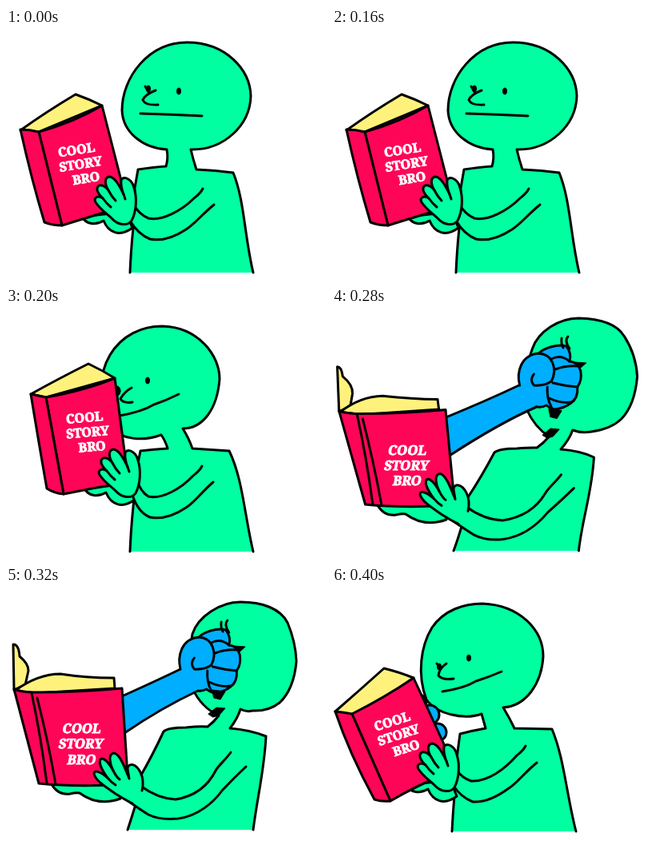
An HTML page that plays this animation: 400 by 314 pixels, repeating every 0.44 s.

```html
<!DOCTYPE html>
<html lang="en">
<head>
<meta charset="utf-8">
<title>Cool story</title>
<style>
  html, body { margin: 0; width: 100%; height: 100%; overflow: hidden; background: #fff; }
  svg { display: block; width: 100%; height: 100%; }
  path, circle, ellipse { stroke: #000; stroke-width: 3; stroke-linejoin: round; stroke-linecap: round; }
  .skin { fill: #00ffa0; }
  .cover { fill: #ff0558; }
  .page { fill: #fff27c; }
  .blue { fill: #00aeff; }
  .line { fill: none; }
  .ink { fill: #000; stroke-width: 1; }
  text { font: 900 16px "Noto Serif", serif; fill: #fff; stroke: #fff; stroke-width: .9; text-anchor: middle; }
  .pose { visibility: hidden; animation: show 440ms steps(1, end) calc(var(--at) * 40ms - 440ms) infinite; }
  .pose.long { animation-name: hold; }
  @keyframes show { 0% { visibility: visible; } 9.0909%, 100% { visibility: hidden; } }
  @keyframes hold { 0% { visibility: visible; } 45.4545%, 100% { visibility: hidden; } }
</style>
</head>
<body>
<svg viewBox="0 0 400 314" preserveAspectRatio="none">
  <defs>
    <g id="title">
      <text y="6">COOL</text>
      <text x="2.3" y="24.5">STORY</text>
      <text x="6.3" y="43">BRO</text>
    </g>
    <path id="under" class="skin" d="M95,236 C100,246 112,247 122,241 C128,256 142,262 158,250 L150,230 Z"/>
    <g id="hand">
      <path class="skin" d="M160,200 C158,190 148,184 144,190 Q143,198 147,208 C142,198 136,186 129,186 C123,187 123,195 128,203 C124,197 116,194 114,200 C113,206 118,210 121,213 C115,209 109,212 112,218 C118,227 128,234 132,238 C140,247 152,248 157,241 C163,230 164,212 160,200 Z"/>
      <path class="line" d="M128,203 Q132,211 137,216 M121,213 Q126,220 131,224 M147,208 L149,214"/>
    </g>
    <g id="grip">
      <path class="skin" d="M170,255 Q173,242 168,232 C162,220 152,220 152,228 Q153,234 154,240 C148,225 142,209 135,208 C127,209 130,222 134,230 C129,221 122,212 118,216 C115,222 122,232 127,239 C119,232 110,228 110,234 C112,243 127,252 137,259 Q148,266 158,271"/>
      <path class="line" d="M134,230 Q138,238 142,241 M127,239 Q132,245 137,248"/>
    </g>
    <g id="fist">
      <path class="blue" d="M244,94 C240,78 245,56 268,54 C275,47 292,42 303,45 Q310,54 307,64 Q318,65 321,76 Q323,88 317,96 Q318,110 309,116 Q300,123 288,124 Q281,122 278,119 Q272,122 267,121"/>
      <path class="line" d="M268,54 C286,55 292,74 284,89 Q275,95 262,94 Q256,87 262,80 M284,61 Q296,55 307,64 M289,74 Q302,69 318,70 M286,91 Q302,95 317,96 M279,96 Q278,110 284,121 M281,110 Q296,117 309,115"/>
      <path class="ink" d="M314,65 L328,66 L320,73 Z"/>
      <path class="line" d="M297,35 Q296,42 299,47 M305,33 Q300,38 307,48"/>
    </g>
    <path id="mouth" class="ink" d="M280,126 L296,128 L290,138 L282,136 Z"/>
    <path id="chin" class="ink" d="M270,160 L280,152 L291,153 L283,162 L276,164 Z"/>
  </defs>

  <g class="pose long" style="--at:0">
    <path class="skin" d="M155,306 Q156,280 159,250 L161,200 L165,177 Q185,174 200,173 Q203,163 201,152 C170,150 146,130 145,103 C145,62 178,18 226,18 C275,18 305,52 306,85 C305,122 272,153 231,152 Q234,165 238,177 Q262,178 284,181 C298,215 298,260 309,306"/>
    <path class="line" d="M168,107 Q205,108 245,110 M174,73 L178,80 M187,78 Q174,83 171,90 Q174,97 190,96"/>
    <ellipse class="ink" cx="178" cy="76" rx="2.5" ry="4"/>
    <ellipse class="ink" cx="216" cy="79" rx="2.5" ry="4"/>
    <use href="#under"/>
    <path class="skin" d="M246,201 C243,207 240,209 235,213 C220,228 195,242 178,238 Q166,233 159,220 L155,241 Q165,258 180,264 C195,267 210,262 225,252 C236,245 243,235 260,221"/>
    <path class="page" d="M18,128 Q50,105 87,83 Q104,89 120,97 L41,130 Z"/>
    <path class="cover" d="M41,130 Q85,118 120,97 L152,222 Q105,236 70,247 Z"/>
    <path class="cover" d="M18,127 Q30,127 41,130 L70,247 Q58,247 48,243 Q32,190 18,127 Z"/>
    <use href="#title" transform="translate(88,152) rotate(-9)"/>
    <use href="#hand"/>
  </g>

  <g class="pose" style="--at:5">
    <path class="skin" d="M155,306 Q156,280 159,250 L163,205 L168,180 Q185,178 202,177 Q199,167 194,160 C172,168 145,167 130,150 C115,120 115,85 130,60 C145,35 170,24 195,24 C240,25 267,60 267,90 C264,128 246,152 221,152 Q229,165 233,177 L279,180 C296,215 298,260 309,306"/>
    <path class="line" d="M142,136 Q170,131 185,122 Q200,117 216,109 M157,101 Q148,106 143,115 Q147,121 158,119"/>
    <ellipse class="ink" cx="139" cy="105" rx="4" ry="6"/>
    <ellipse class="ink" cx="177" cy="92" rx="2.5" ry="4"/>
    <use href="#under" transform="translate(3,-9)"/>
    <path class="skin" d="M245,199 C242,205 239,207 234,211 C219,227 195,241 178,237 Q168,231 163,215 L158,235 Q165,257 180,263 C195,266 210,261 225,251 C236,244 243,233 259,219"/>
    <path class="page" d="M31,109 Q65,90 103,71 Q120,79 136,89 L50,113 Z"/>
    <path class="cover" d="M50,113 Q100,104 136,89 L148,180 L150,220 Q110,226 72,234 Z"/>
    <path class="cover" d="M31,109 L50,113 L72,234 Q60,233 51,227 Q41,170 31,109 Z"/>
    <use href="#title" transform="translate(98,138) rotate(-5)"/>
    <use href="#hand" transform="translate(5,-8)"/>
  </g>

  <g class="pose" style="--at:6" id="hit">
    <path class="skin" d="M152,305 Q158,290 163,272 L170,240 Q188,215 207,182 Q214,177 235,177 Q250,176 259,176 Q268,170 275,162 Q260,150 250,128 C245,100 252,70 262,47 C270,25 295,10 318,10 C345,11 365,17 374,30 Q392,52 394,82 Q391,118 375,136 Q362,150 335,156 Q318,158 306,154 Q302,165 290,178 Q315,180 329,188 C327,230 312,265 308,305"/>
    <path class="blue" d="M138,139 Q195,117 244,94 L262,90 L272,110 L266,121 Q220,140 148,186"/>
    <use href="#fist" transform="translate(0,0) scale(1,1)"/>
    <use href="#mouth" transform="translate(0,0)"/>
    <use href="#chin" transform="translate(0,0)"/>
    <path class="skin" d="M57,248 Q65,262 80,260 Q88,258 92,259 Q115,276 143,266 L140,240 Z"/>
    <path class="skin" d="M290,211 C282,221 274,227 270,234 C256,255 238,264 214,267 Q190,266 168,250 L140,260 Q165,277 178,285 Q194,293 214,290 C240,286 258,270 270,257 Q290,241 304,227"/>
    <path class="page" d="M5,76 Q9,76 11,86 Q25,97 24,110 L22,125 L8,131 Z"/>
    <path class="page" d="M9,132 Q32,113 60,112 Q100,115 130,116 L132,128 L38,135 Z"/>
    <path class="cover" d="M8,131 Q20,134 36,134 Q90,134 140,129 L151,222 L150,248 Q90,252 42,247 Z"/>
    <path class="line" d="M31,135 Q43,190 51,247 M38,140 Q52,195 62,248"/>
    <use href="#title" transform="translate(94,179) skewX(-10) scale(1.04)"/>
    <use href="#grip" transform="translate(0,0)"/>
  </g>

  <g class="pose" style="--at:7" id="between"></g>

  <g class="pose" style="--at:8" id="recoil">
    <path class="skin" d="M152,305 Q157,290 163,270 L168,238 Q183,212 197,182 Q203,177 225,177 Q242,175 252,176 Q260,170 266,162 Q244,152 233,128 C226,105 230,75 233,60 C240,38 268,20 293,20 C320,20 343,28 352,46 Q362,70 363,94 Q360,129 342,146 Q328,157 308,156 Q300,158 293,154 Q290,165 280,178 Q305,180 325,188 C323,230 314,265 309,305"/>
    <path class="blue" d="M138,141 Q185,120 218,104 L236,100 L245,119 L240,131 Q195,152 148,184"/>
    <use href="#fist" transform="translate(-17.5,10) scale(0.965,1)"/>
    <use href="#mouth" transform="translate(-22,4)"/>
    <use href="#chin" transform="translate(-17,0)"/>
    <path class="skin" d="M57,248 Q65,262 80,260 Q88,258 92,259 Q115,276 143,266 L140,240 Z"/>
    <path class="skin" d="M281,208 C274,218 266,224 262,231 C250,255 230,264 212,267 Q190,266 168,250 L140,260 Q165,278 178,286 Q192,293 215,291 C240,288 260,270 270,256 Q285,240 300,226"/>
    <path class="page" d="M9,73 Q16,73 17,88 Q28,97 28,106 L24,124 L10,130 Z"/>
    <path class="page" d="M11,131 Q40,110 68,110 Q100,115 135,115 L136,128 L38,134 Z"/>
    <path class="cover" d="M10,129 Q20,133 36,133 Q90,133 145,128 L151,222 L150,248 Q90,252 41,247 Z"/>
    <path class="line" d="M32,134 Q44,190 51,247 M39,140 Q53,195 62,248"/>
    <use href="#title" transform="translate(95,178) skewX(-10) scale(1.04)"/>
    <use href="#grip" transform="translate(0,1)"/>
  </g>

  <g class="pose" style="--at:9">
    <path class="skin" d="M152,305 Q156,290 162,268 L168,235 Q180,205 188,182 Q195,177 205,178 Q220,177 236,178 Q241,170 243,163 Q225,156 208,135 C188,105 190,75 193,62 C200,40 225,24 246,24 C270,24 292,30 303,45 Q318,70 321,98 Q322,130 310,145 Q298,157 283,157 Q277,158 270,156 Q269,167 264,178 Q290,178 315,180 C314,220 310,265 308,305"/>
    <path class="blue" d="M138,143 Q165,129 187,115 L201,110 L209,130 L205,142 Q185,158 148,188"/>
    <use href="#fist" transform="translate(-8.5,20) scale(0.8,1)"/>
    <use href="#mouth" transform="translate(-45,11)"/>
    <use href="#chin" transform="translate(-32,4)"/>
    <path class="skin" d="M63,247 Q71,261 86,257 Q94,255 97,258 Q120,276 145,266 L143,240 Z"/>
    <path class="skin" d="M276,208 C268,220 262,228 256,237 C246,255 228,266 208,267 Q190,266 168,252 L143,260 Q165,278 175,285 Q190,293 210,292 C235,288 252,270 265,254 Q280,236 297,222"/>
    <path class="page" d="M10,76 Q17,76 18,92 Q31,101 30,110 L27,126 L15,131 Z"/>
    <path class="page" d="M16,132 Q42,113 68,113 Q95,120 130,121 L131,132 L40,136 Z"/>
    <path class="cover" d="M15,131 Q24,135 38,135 Q90,136 141,132 L152,222 L152,244 Q95,250 49,245 Z"/>
    <path class="line" d="M36,136 Q51,190 58,246 M43,141 Q58,195 69,246"/>
    <use href="#title" transform="translate(100,177) skewX(-8) scale(1.02)"/>
    <use href="#grip" transform="translate(4,3)"/>
  </g>

  <g class="pose" style="--at:10">
    <path class="skin" d="M150,307 Q151,285 154,250 L156,215 L160,185 Q175,181 192,178 L187,160 C165,168 130,160 118,142 C106,110 111,75 125,52 C140,30 165,22 188,22 C235,24 264,55 264,88 C262,122 243,150 214,152 Q222,165 228,178 L275,179 C290,215 293,260 305,307"/>
    <path class="line" d="M138,132 Q165,128 180,119 Q196,114 212,107 M131,97 L136,104 M143,97 Q134,103 133,112 Q138,118 152,116"/>
    <ellipse class="ink" cx="134" cy="101" rx="2.5" ry="4"/>
    <ellipse class="ink" cx="171" cy="90" rx="2.5" ry="4"/>
    <circle class="blue" cx="109" cy="145" r="9"/>
    <circle class="blue" cx="122" cy="161" r="12"/>
    <circle class="blue" cx="132" cy="183" r="11"/>
    <use href="#under" transform="translate(-2,13)"/>
    <path class="skin" d="M242,200 C239,206 236,208 231,212 C216,229 195,245 174,244 Q162,240 156,230 L152,250 Q161,264 176,270 C191,271 206,264 221,253 C232,246 239,235 256,221"/>
    <path class="page" d="M4,157 Q35,130 65,103 Q85,108 102,115 Q65,142 25,161 Z"/>
    <path class="cover" d="M25,160 Q65,140 102,115 L140,198 L142,235 Q105,250 73,269 Z"/>
    <path class="cover" d="M4,157 Q15,158 25,160 L73,269 Q62,270 53,267 Q22,210 4,157 Z"/>
    <use href="#title" transform="translate(75,169) rotate(-18)"/>
    <use href="#hand" transform="translate(-4,11)"/>
  </g>
</svg>
<script>
  // Blend every number in one pose's markup towards the matching number in another.
  const number = /-?\d+(\.\d+)?/g;
  const blend = (a, b, t) => {
    const ends = b.match(number);
    let i = 0;
    return a.replace(number, n => +(n * (1 - t) + ends[i++] * t).toFixed(2));
  };
  const get = id => document.getElementById(id);
  get('between').innerHTML = blend(get('hit').innerHTML, get('recoil').innerHTML, 0.4);
</script>
</body>
</html>
```
